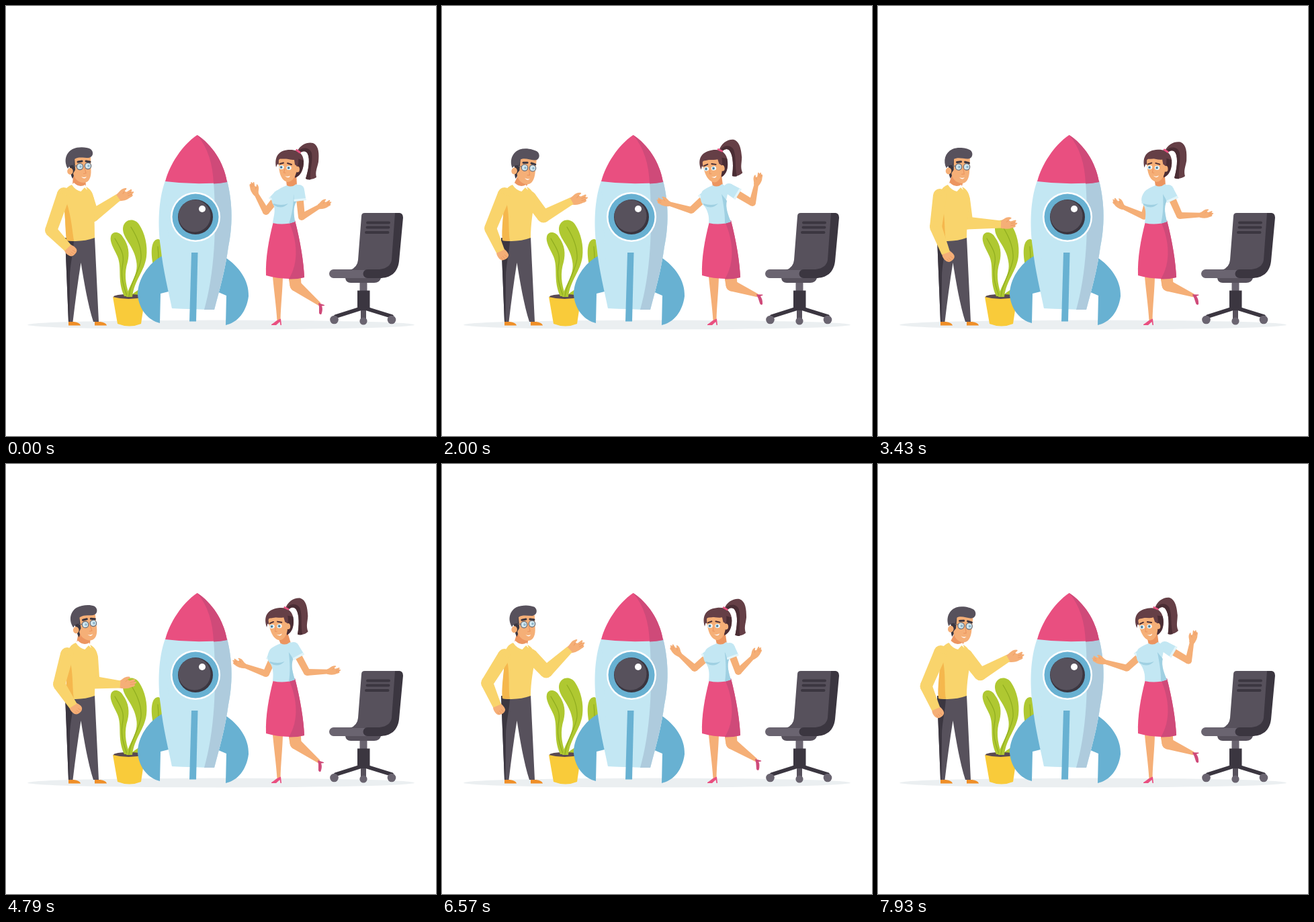
Write an HTML page with a canvas that moves like this. It is 640 px wide and 640 px high and loops after 8 s.

```html
<!DOCTYPE html>
<html lang="en">
<head>
<meta charset="utf-8">
<title>Rocket team</title>
<style>
html, body { margin: 0; width: 100%; height: 100%; overflow: hidden; background: #fff; }
canvas { display: block; width: 640px; height: 640px; }
</style>
</head>
<body>
<canvas id="stage"></canvas>
<script>
const LOOP = 8000, CYCLE = 6000;
const KEY_TIMES = [0, 570, 1070, 2000, 3430, 4790];

const INK = '#3b3640', GREY = '#57515c', MID = '#6a6470';
const SKIN = '#f5af77', SKIN_SHADE = '#ec9560';
const PINK = '#e94f80', PINK_SHADE = '#cf4a79';
const ICE = '#c3e7f3', ICE_SHADE = '#9fd0e2', BLUE = '#68b1d2';
const YELLOW = '#f9d46c', AMBER = '#f5b74d', LEAF = '#afc831', VEIN = '#8fac1f';
const HAIR = '#653f46', HAIR_DARK = '#4a2d34';

// One row per key time. Head: x, y, turn. Arm: shoulder, elbow, wrist, hand turn.
const man = {
  lean: [[0], [8], [20], [7], [6], [6]],
  head: [[116, 238.5, 0], [128, 238.5, -1], [142.5, 242, 3], [129, 241, 8], [126, 239.5, 4], [124, 238, -5]],
  back: arm([
    [86, 280, 67, 334, 92, 360, 40], [93, 285, 67, 326, 82, 360, 55], [101, 280, 69, 321, 76, 357, 75],
    [93, 280, 72, 331, 87, 365, 55], [92, 282, 86, 329, 101, 368, 48], [91, 283, 79, 328, 100, 360, 42]]),
  front: arm([
    [121, 288, 129, 312, 167, 285, -12], [132, 285, 155, 309, 190, 276, -17], [142, 288, 170, 314, 206, 286, -14],
    [130, 285, 151, 313, 193, 290, -4], [127, 288, 132, 323, 183, 325, 4], [127, 288, 130, 325, 170, 328, 0]])
};
const woman = {
  lean: [[0], [-9], [-15], [-15], [-5], [-9]],
  head: [[415.5, 240.5, 0], [404.5, 241, -5], [397, 242.5, -10], [399, 242, -10], [410, 240.5, -2], [401.5, 241.5, -8]],
  front: arm([
    [406, 282, 387, 306, 372, 279, -120], [402, 281, 376, 304, 353, 283, -142], [398, 279, 367, 302, 333, 295, -178],
    [398, 279, 371, 304, 337, 294, -170], [404, 285, 396, 313, 364, 299, -150], [401, 281, 387, 312, 354, 300, -163]]),
  back: arm([
    [436, 274, 440, 314, 467, 298, -12], [428, 274, 441, 309, 463, 287, -42], [426, 272, 453, 301, 463, 274, -64],
    [427, 272, 462, 293, 468, 265, -62], [432, 274, 449, 312, 481, 311, 0], [428, 273, 448, 310, 480, 309, 0]]),
  foot: [[466, 443, 0], [467, 440, -4], [470, 431, -18], [469, 430, -18], [469, 430, -18], [465, 442, 0]]
};

const canvas = document.getElementById('stage');
const ctx = canvas.getContext('2d');
const density = window.devicePixelRatio || 1;
canvas.width = canvas.height = 640 * density;

// Store the wrist as angle and length, so forearms swing in arcs.
function arm(rows) {
  return rows.map(([sx, sy, ex, ey, wx, wy, turn]) =>
    [sx, sy, ex, ey, Math.atan2(wy - ey, wx - ex), Math.hypot(wx - ex, wy - ey), turn]);
}

// Smooth cyclic curve through the rows.
function pose(rows, t) {
  const n = rows.length;
  const time = k => KEY_TIMES[(k + n) % n] + Math.floor(k / n) * CYCLE;
  const row = k => rows[(k + n) % n];
  let i = n - 1;
  while (KEY_TIMES[i] > t) i--;
  const span = time(i + 1) - time(i), u = (t - time(i)) / span;
  const slope = (k, c) => (row(k + 1)[c] - row(k - 1)[c]) / (time(k + 1) - time(k - 1));
  return row(i).map((a, c) => {
    const b = row(i + 1)[c], m = slope(i, c) * span, w = slope(i + 1, c) * span;
    return a + u * (m + u * (3 * (b - a) - 2 * m - w + u * (2 * (a - b) + m + w)));
  });
}

function fill(color, d) {
  ctx.fillStyle = color;
  ctx.fill(new Path2D(d));
}
function line(color, width, d) {
  ctx.strokeStyle = color;
  ctx.lineWidth = width;
  ctx.lineCap = ctx.lineJoin = 'round';
  ctx.stroke(new Path2D(d));
}
function oval(color, x, y, rx, ry = rx) {
  ctx.fillStyle = color;
  ctx.beginPath();
  ctx.ellipse(x, y, rx, ry, 0, 0, 7);
  ctx.fill();
}
function local(x, y, degrees, sx, sy, draw) {
  ctx.save();
  ctx.translate(x, y);
  ctx.rotate(degrees * Math.PI / 180);
  ctx.scale(sx, sy);
  draw();
  ctx.restore();
}

// Tapered bar between two points with half widths a and b.
function bar(color, x1, y1, x2, y2, a, b) {
  const len = Math.hypot(x2 - x1, y2 - y1) || 1;
  const nx = (y1 - y2) / len, ny = (x2 - x1) / len;
  fill(color, `M${x1 + nx * a} ${y1 + ny * a}L${x2 + nx * b} ${y2 + ny * b}
    L${x2 - nx * b} ${y2 - ny * b}L${x1 - nx * a} ${y1 - ny * a}Z`);
}
function limb(color, x1, y1, x2, y2, x3, y3, a, b, c) {
  oval(color, x1, y1, a);
  bar(color, x1, y1, x2, y2, a, b);
  oval(color, x2, y2, b);
  bar(color, x2, y2, x3, y3, b, c);
}
function drawArm(color, p, widths) {
  const [sx, sy, ex, ey, angle, len] = p;
  limb(color, sx, sy, ex, ey, ex + Math.cos(angle) * len, ey + Math.sin(angle) * len, ...widths);
}
function atWrist(p, sx, sy, draw) {
  local(p[2] + Math.cos(p[4]) * p[5], p[3] + Math.sin(p[4]) * p[5], p[6], sx, sy, draw);
}
function openHand() {
  fill(SKIN, `M-3 -4.5C3 -6 5 -12 13 -11.5Q17 -11 13 -8.5L11 -7L14 -5.5L21 -8Q24 -7 20 -4
    L24 -4Q25 -2 21 -.5L22 1Q22 3 17 4Q9 8 -3 5Z`);
  line(SKIN_SHADE, .8, 'M11 -7L8 -4M21 -4L15 -2.5M21 -.5L15 .5');
}
function fist() {
  fill(SKIN, 'M-3 -5Q5 -9 11 -7Q15 -5 14 2Q13 8 6 8Q0 8 -3 5Z');
  line(SKIN_SHADE, .8, 'M13 -3L8 -2M13 1L8 1.5M12 4.5L8 4.5');
}

function drawPlant() {
  fill(LEAF, 'M184 433C195 420 222 415 220 390C215 370 215 348 226 347C236 347 236 375 234 400C230 425 200 425 190 434Z');
  line(VEIN, 1.2, 'M226 358Q228 380 226 395');
  fill('#5a4a52', 'M160 433A22 4 0 0 1 205 433L205 436L160 436Z');
  fill(LEAF, 'M176 432C165 408 173 390 166 373C160 360 154 351 156 343C158 335 169 335 174 344C183 356 184 369 181 381C176 397 177 412 184 432Z');
  line(VEIN, 1.2, 'M162 346C170 360 176 368 174 382C170 400 174 415 180 431');
  fill(LEAF, 'M179 433C183 415 198 400 194 380C191 358 174 346 174 332C174 317 191 314 198 325C207 338 211 357 209 373C206 396 191 407 188 433Z');
  line(VEIN, 1.2, 'M186 329C196 345 202 360 201 376C199 395 186 408 183 432');
  fill('#f9cb3a', 'M159 433Q182 439 207 433L201 473Q184 480 166 473Z');
}

function drawRocket() {
  fill(BLUE, 'M234 371C211 383 196 407 196 430C198 452 212 468 229 472L230 428L246 424L250 390Z');
  fill(BLUE, 'M326 374C346 387 362 408 361 432C358 455 345 471 327 475L328 431L314 425L312 390Z');
  const side = 'C338 295 337 330 331 358C326 395 317 425 310 452';
  fill(ICE, `M237 260C226 290 226 330 230 358C234 395 242 425 247 450L310 452L329 260${side}Z`);
  fill(ICE, `M237 260L329 260${side}L247 450Z`);
  fill('#aecbdd', `M309 262L329 260${side}L295 452C310 400 314 330 309 262Z`);
  fill(PINK, 'M284.500 192C262 207 243 237 237 261Q283 267 329 262C324 232 306 206 284.500 192Z');
  fill(PINK_SHADE, 'M284.500 192C300 210 308 235 309 264.500Q320 264 329 262C324 232 306 206 284.500 192Z');
  oval('#fff', 282, 314, 37);
  oval(BLUE, 282, 314, 34.5);
  oval(INK, 282, 314, 26);
  oval(GREY, 280.5, 312.5, 24);
  oval('#fff', 292, 302, 5);
  fill(BLUE, 'M276 367L285.500 367L283 469.500L273 469.500Z');
}

function drawChair() {
  fill(MID, 'M487.500 392H550V405H487.500A6.500 6.500 0 0 1 487.500 392Z');
  fill(GREY, 'M534 308H584L576 380Q572 393 556 393H512Q523 389 524 378L529 313Q529 308 534 308Z');
  fill(INK, 'M579 308H586Q591 309 591 315L585 380C583 397 572 405 556 405H538A6.500 6.500 0 0 1 538 392H556Q572 390 574 378Z');
  line(INK, 4, 'M538 322.500H570M537.500 329.500H569.500M536 337H568.500');
  fill(GREY, 'M505 405H558Q556 412 548 412H513Q506 412 505 405Z');
  fill(MID, 'M526.500 412H537.500V424H526.500Z');
  line(INK, 6, 'M532 449L491 462M532 449L574 462');
  fill(GREY, 'M528 452H536V465H528Z');
  fill(INK, 'M523 423.500H541.500V453H523Z');
  oval(MID, 488.5, 467, 6.3);
  oval(MID, 532, 469, 5.6);
  oval(MID, 574, 467, 6.3);
}

function manHead() {
  ctx.translate(-116, -238.5);
  fill(INK, 'M91 230L104 226L104 246L99 257Q96 252 96 243Z');
  oval(SKIN, 95.5, 246, 4.3, 5);
  fill(SKIN, 'M102 225L126 225L126.500 244C127 254 124 263 116 263C108 263 101 257 100 249L103 244Z');
  fill(GREY, 'M92 242C86 232 88 219 99 213C108 209 120 210 126 213C131 217 130 225 123 226C115 226 107 224 102 228L101 237Q95 236 92 242Z');
  line(INK, 3, 'M107 232L113 231M119 231L125 232');
  line('#676a74', 1, 'M101 238L105 238');
  for (const [x, y] of [[110, 239], [122, 238]]) {
    oval('#676a74', x, y, 5.3);
    oval('#d2e6ed', x, y, 4.1);
    oval('#8bb4cb', x + 1, y, 1.8);
  }
  line(SKIN_SHADE, 1.2, 'M117 241L119 249L115.500 249.500');
  fill('#fff', 'M112 254Q116 256 120 254Q117 259 112 254Z');
}

function drawMan(t) {
  const [s] = pose(man.lean, t), head = pose(man.head, t);
  const front = pose(man.front, t), back = pose(man.back, t);
  const sleeve = [10, 9.5, 5.5], h = head[0] - 116, v = head[1] - 238.5;
  fill('#ef8f28', 'M93 470H101Q110 471 111 475.500H93Z');
  fill('#ef8f28', 'M132 470H140Q149 471 150 475.500H132Z');
  fill(GREY, 'M88 345L93 470H99.500C103 440 107 410 111.500 382C116 410 122 445 130 470H138L132 344Z');
  fill(INK, 'M88 345H101C101 365 95 385 95 403L94.500 470H93Z');
  atWrist(front, 1, 1, openHand);
  drawArm(YELLOW, front, sleeve);
  fill(SKIN_SHADE, `M${100 + h} ${250 + v}L${99 + s} 267Q${110 + s} 275 ${119 + s} 268L${118 + h} ${256 + v}Z`);
  fill(YELLOW, `M${98 + s} 266Q${84 + s} 271 ${85 + s} 292C${88 + s * .6} 310 89 330 90 349
    Q113 352 132 345C132 325 ${131 + s * .6} 305 ${131 + s} 290Q${130 + s} 274 ${119 + s} 269Q${110 + s} 276 ${98 + s} 266Z`);
  fill(AMBER, `M${86 + s} 280C${88 + s * .6} 310 88 330 90 349Q96 350 101 349C98 330 ${97 + s * .7} 308 ${86 + s} 280Z`);
  local(s, 0, 0, 1, 1, () =>
    fill('#fff', 'M98 266L101 263Q109 271 118 266L121 274L117 270L111.500 276Q103 274 98 266Z'));
  atWrist(back, 1, 1, fist);
  drawArm(YELLOW, back, [10, 9, 6.5]);
  local(...head, 1, 1, manHead);
}

function ponytail() {
  ctx.translate(-415.5, -240.5);
  fill(HAIR, 'M433 217C438 206 449 202 457 204C466 208 466 220 465 232C463 242 460 246 462 255Q455 260 446 257C450 245 453 228 449 220C446 214 440 216 436 220Z');
  fill(HAIR_DARK, 'M434 217C441 209 452 210 455 219C457 232 452 243 453 258.500Q449 259 446 257C450 245 453 228 449 220C446 214 440 216 436 220Z');
}

function womanHead() {
  ctx.translate(-415.5, -240.5);
  fill(HAIR, 'M402 240C399 224 406 214 423 214C438 214 444 223 443 235C442 246 438 252 432 255L404 235Z');
  fill(HAIR_DARK, 'M431 226L443 230C443 244 438 252 430 256Z');
  fill(SKIN, 'M406 227C414 229 424 225 430 227L433 240C433 253 426 262 419 262C410 260 405 249 406 227Z');
  oval(SKIN, 433.5, 243, 3.5, 4.5);
  fill(HAIR, 'M403 238C401 222 410 215 424 215C436 217 437 228 434 239L430 236L429 229C421 230 412 224 407 228Q404 231 403 238Z');
  line(PINK, 2.8, 'M432.500 214.500L437.500 218');
  line(HAIR_DARK, 1.9, 'M407.500 235L413 233.500M419 234L425 236');
  for (const [x, y] of [[410, 240], [421, 241]]) {
    oval('#fff', x, y, 3.7, 3.1);
    oval('#7fb9d6', x - .4, y, 2.3);
    oval(INK, x - .4, y, .9);
  }
  line(SKIN_SHADE, 1.1, 'M415 242L413.500 248L416 248.500');
  fill('#fff', 'M414.500 252.500Q419 255 423 252.500Q421 258 414.500 252.500Z');
}

function sleeve(p) {
  const [sx, sy, ex, ey] = p;
  const along = k => [sx + (ex - sx) * k, sy + (ey - sy) * k];
  oval(ICE, sx, sy, 8);
  bar(ICE, sx, sy, ...along(.4), 8, 9);
  bar('#e3f5fa', ...along(.32), ...along(.4), 8.8, 9);
}

function drawWoman(t) {
  const [s] = pose(woman.lean, t), head = pose(woman.head, t);
  const front = pose(woman.front, t), back = pose(woman.back, t);
  const foot = pose(woman.foot, t), h = head[0] - 415.5;
  const bare = [5.5, 5, 3.2];
  local(...head, 1, 1, ponytail);
  limb(SKIN, 430, 406, 431, 416, foot[0] + 1, foot[1] + 1, 9, 8.5, 2.5);
  local(...foot, 1, 1, () =>
    fill(PINK_SHADE, 'M-1 -1L8 2L8 3L4 3.500Q6 8 3.500 15.500Q1 17 0 14L0 5Z'));
  fill(SKIN, 'M397 403H412C411.500 425 409 445 408.500 468H403.500C402 445 399 425 397 403Z');
  fill(PINK, 'M395 474C399 472 403 467 409 465.500L410 475H408.500L407.500 470L402 475H395Z');
  fill(PINK, 'M398 321L430 319C438 350 443 380 444 404Q415 409 387 401C386 375 391 348 398 321Z');
  fill(PINK_SHADE, 'M421 321L430 319C438 350 443 380 444 404Q432 407 421 406.500C436 382 434 350 421 321Z');
  atWrist(front, .75, -.75, openHand);
  drawArm(SKIN, front, bare);
  sleeve(front);
  fill(SKIN_SHADE, `M${416 + h} 252L${418 + s} 268Q${426 + s} 275 ${433 + s} 267L${432 + h} 247Z`);
  fill(ICE, `M${418 + s} 267Q${407 + s} 271 ${402 + s} 276C${395 + s * .7} 283 ${394 + s * .7} 291 ${398 + s * .6} 296
    C${402 + s * .4} 304 398 314 397 323Q414 327 430 321C${429 + s * .2} 312 ${426 + s * .3} 300 ${432 + s * .6} 289
    L${440 + s} 280Q${441 + s} 269 ${432 + s} 265Q${425 + s} 271 ${418 + s} 267Z`);
  fill(ICE_SHADE, `M${398 + s * .6} 294Q${410 + s * .6} 298 ${420 + s * .6} 294Q${410 + s * .6} 304 ${398 + s * .6} 296Z`);
  fill(ICE_SHADE, `M${428 + s * .8} 280L${433 + s * .6} 290C${426 + s * .3} 300 ${429 + s * .2} 312 430 321
    L421 324C${426 + s * .3} 310 ${428 + s * .6} 295 ${428 + s * .8} 280Z`);
  atWrist(back, .75, .75, openHand);
  drawArm(SKIN, back, bare);
  sleeve(back);
  local(...head, 1, 1, womanHead);
}

function frame(now) {
  const t = now % LOOP % CYCLE;
  ctx.setTransform(density, 0, 0, density, 0, 0);
  ctx.fillStyle = '#fff';
  ctx.fillRect(0, 0, 640, 640);
  oval('#ebeff1', 320, 474.5, 288, 7);
  drawPlant();
  drawRocket();
  drawChair();
  drawMan(t);
  drawWoman(t);
}

const start = performance.now();
function tick() {
  frame(performance.now() - start);
  requestAnimationFrame(tick);
}
tick();
</script>
</body>
</html>
```
